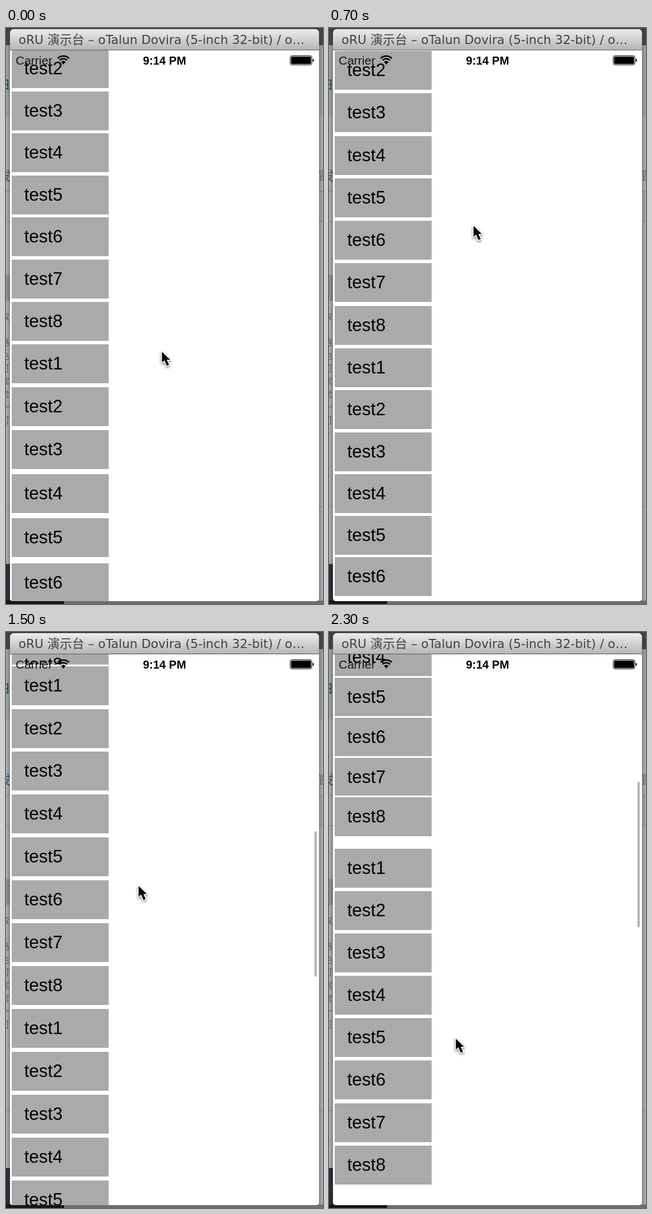
Animation of 556 by 1007 pixels, one loop 2400 ms. Source, as an HTML page with a canvas:

```html
<!DOCTYPE html>
<html lang="zh">
<head>
<meta charset="utf-8">
<title>Springy list</title>
<style>
  html, body { margin: 0; width: 100%; height: 100%; overflow: hidden; background: #999; }
  canvas { display: block; }
</style>
</head>
<body>
<canvas id="stage" width="556" height="1007"></canvas>
<script>
const c = document.getElementById('stage').getContext('2d');
const LOOP = 2400, STEP = 100, SCROLL_START = 1300;
const SANS = '"Liberation Sans", Arial, sans-serif';
const CJK = '"Noto Sans CJK SC", "Noto Sans CJK", sans-serif';
const TITLE = '"DejaVu Sans", ' + CJK;

// Key points of the drag: time, pointer x, pointer y, scroll position.
const keys = [
  [0, 272, 563, 37],
  [300, 272, 563, 38],
  [700, 252, 343, 40],
  [1200, 243, 274, 36],
  [1500, 231, 441, 134.5],
  [1800, 221, 699, 433],
  [2300, 221, 708, 453]
];

// Monotone cubic through one column of the key points.
function track(col, t) {
  const rate = i => keys[i + 1] && keys[i]
    ? (keys[i + 1][col] - keys[i][col]) / (keys[i + 1][0] - keys[i][0]) : 0;
  const slope = i => {
    const a = rate(i - 1), b = rate(i);
    return a * b > 0 ? 2 * a * b / (a + b) : 0;
  };
  let i = 0;
  while (i < keys.length - 2 && t >= keys[i + 1][0]) i++;
  const h = keys[i + 1][0] - keys[i][0];
  const p = Math.min(1, (t - keys[i][0]) / h), q = 1 - p;
  return keys[i][col] * q * q * (1 + 2 * p) + keys[i + 1][col] * p * p * (3 - 2 * p)
    + h * p * q * (slope(i) * q - slope(i + 1) * p);
}

const wave = (t, period) => Math.cos(2 * Math.PI * t / period);

// Springs: the pitch breathes, the tail swings and dies down, the upper group lags behind.
function cellTop(k, t) {
  const pitch = 74.3 - 0.7 * wave(t, 2900);
  const tail = 0.43 * wave(t, 2000) * Math.exp(-t / 1500);
  let y = track(3, t) + pitch * k + tail * Math.max(0, k - 6) ** 2;
  if (k <= -2) y += Math.min(40, 38 - (t - 1500) / 15) - 4.3 * (k + 2);
  return Math.round(y);
}

function rect(x, y, w, h, fill) {
  c.fillStyle = fill;
  c.fillRect(x, y, w, h);
}

function round(x, y, w, h, r, fill) {
  c.fillStyle = fill;
  c.beginPath();
  c.roundRect(x, y, w, h, r);
  c.fill();
}

function text(s, x, y, font, fill, align = 'left') {
  c.font = font;
  c.fillStyle = fill;
  c.textAlign = align;
  c.fillText(s, x, y);
}

function shade(x0, y0, x1, y1, from, to) {
  const g = c.createLinearGradient(x0, y0, x1, y1);
  g.addColorStop(0, from);
  g.addColorStop(1, to);
  return g;
}

function backdrop() {
  rect(0, 0, 556, 1007, '#b4b4b4');
  rect(0, 0, 556, 30, '#414141');
  rect(0, 30, 556, 125, '#a6aaa9');
  rect(0, 432, 8, 45, '#969696');
  for (const y of [285, 338, 836]) rect(0, y, 556, 1, '#8c8c8c');
  rect(553, 285, 1, 53, '#8c8c8c');
  text('伯', -17, 106, '24px ' + CJK, '#1d5a35');
  text('发', -13, 266, '22px ' + CJK, '#25577f');
  text('置', 547, 266, '20px ' + CJK, '#777');
  [...'取 略色可案常一可'].forEach((s, i) => text(s, -9, 510 + i * 22.6, '15px ' + CJK, '#666'));
  rect(0, 30, 7, 972, shade(0, 0, 7, 0, '#0000', '#0004'));
  rect(549, 30, 7, 972, shade(549, 0, 556, 0, '#0004', '#0000'));
  rect(0, 937, 8, 70, '#2b2b35');
  rect(0, 1001, 556, 6, '#6f6f6f');
  rect(0, 1001, 102, 6, '#171717');
}

function appWindow() {
  round(7, 2, 542, 1000, [7, 7, 5, 5], '#fff');
  round(7, 2, 542, 37, [7, 7, 0, 0], shade(0, 2, 0, 39, '#ececec', '#b5b5b5'));
  rect(7, 38, 542, 1, '#606060');
  text('oRU 演示台 – oTalun Dovira (5-inch 32-bit) / o…', 22, 28, '21.5px ' + TITLE, '#414141');
}

function cell(k, y) {
  rect(7, y - 3, 176, 74, '#fff');
  rect(10, y, 170, 68, '#aaa');
  text('test' + ((k + 9) % 8 + 1), 32, y + 44, '31px ' + SANS, '#000');
}

function list(t) {
  c.save();
  c.beginPath();
  c.roundRect(7, 39, 542, 963, [0, 0, 5, 5]);
  c.clip();
  for (let k = -7; k < 14; k++) {
    const y = cellTop(k, t);
    // Cells starting too near the bottom edge are not laid out.
    if (y > -75 && y < 966) cell(k, y);
  }
  c.restore();
}

function statusBar() {
  text('Carrier', 17, 64, '21px ' + SANS, '#151515');
  text('9:14 PM', 278, 64, 'bold 20px ' + SANS, '#000', 'center');
  const wedge = [-Math.PI * 0.75, -Math.PI * 0.25];
  c.strokeStyle = c.fillStyle = '#000';
  c.lineWidth = 2.6;
  for (const r of [14, 9.3]) {
    c.beginPath();
    c.arc(100.5, 63, r, ...wedge);
    c.stroke();
  }
  c.beginPath();
  c.moveTo(100.5, 64);
  c.arc(100.5, 63, 5.6, ...wedge);
  c.fill();
  c.lineWidth = 1;
  c.beginPath();
  c.roundRect(498.5, 48.5, 38, 16, 3);
  c.stroke();
  round(500, 50, 35, 13, 1.5, '#000');
  round(538, 54, 2, 5, [0, 2, 2, 0], '#000');
}

const arrow = new Path2D('M1.5 3V22L6 18L10 27.5L14 26L10 17H16Z');

function pointer(x, y) {
  c.save();
  c.translate(x, y);
  c.lineJoin = 'round';
  c.lineWidth = 3;
  c.strokeStyle = '#fff';
  c.shadowColor = '#0008';
  c.shadowBlur = 4;
  c.shadowOffsetY = 2;
  c.stroke(arrow);
  c.shadowColor = 'transparent';
  c.fillStyle = '#000';
  c.fill(arrow);
  c.restore();
}

function draw(t) {
  backdrop();
  appWindow();
  list(t);
  statusBar();
  if (t >= SCROLL_START) round(541, 384.6 - 0.272 * track(3, t), 4, 255, 2, '#b3b3b3');
  pointer(track(1, t), track(2, t));
}

const start = performance.now();
function tick() {
  const t = (performance.now() - start) % LOOP;
  draw(Math.floor(t / STEP) * STEP);
  requestAnimationFrame(tick);
}
tick();
</script>
</body>
</html>
```
